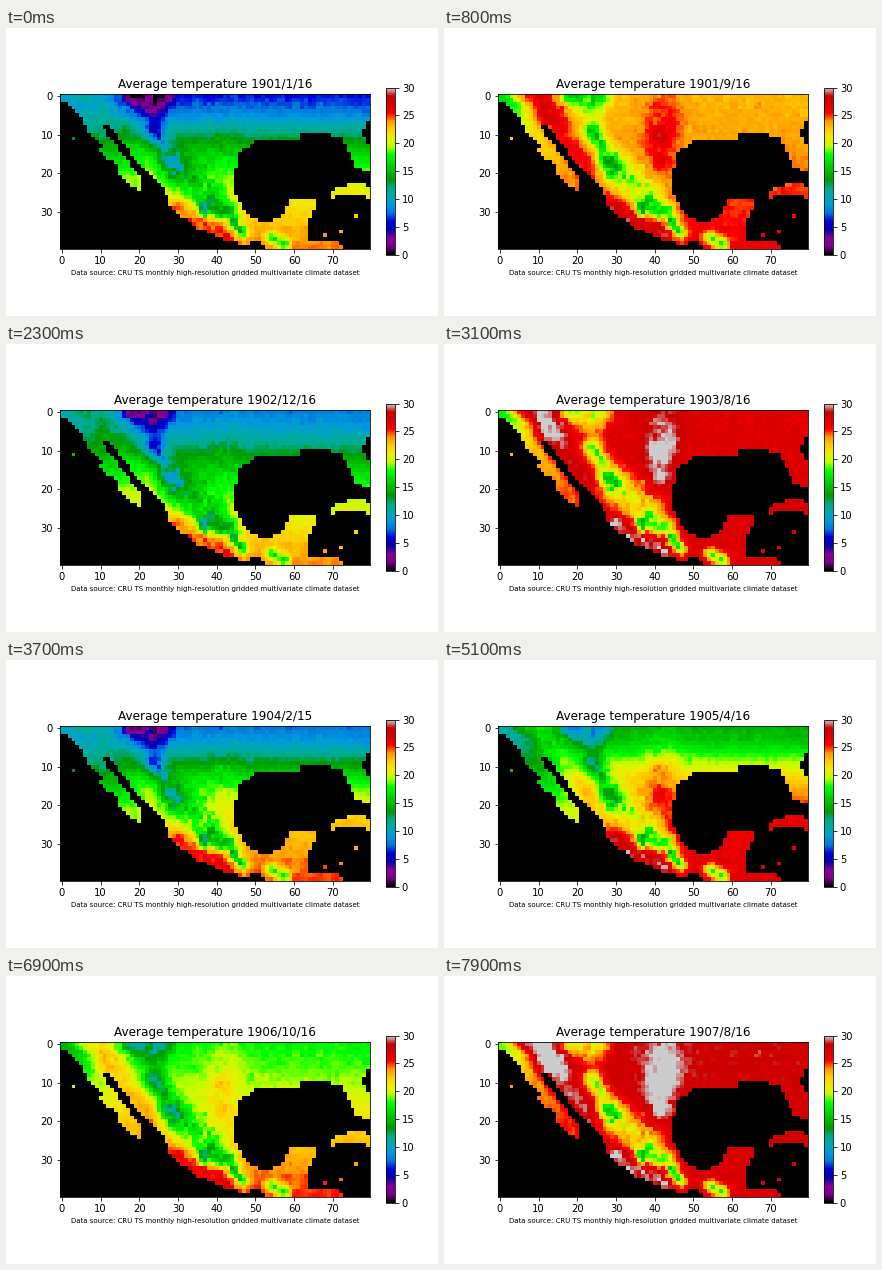
A matplotlib script that plays this animation: 432x288 px, repeating every 8000 ms.

```python
import matplotlib.pyplot as plt
import numpy as np
from matplotlib.animation import FuncAnimation
from matplotlib.path import Path

ROWS, COLS, MONTHS = 40, 80, 80
LEFT, TOP = -120, 35  # half-degree cells from this corner

# Coastlines as (lon, lat)
PACIFIC = [(-121, 36), (-121, 34.6), (-118.4, 33.8), (-117.1, 32.4), (-115.7, 29.7),
           (-114.2, 28.1), (-115, 27.8), (-112.6, 26.2), (-112.1, 24.7),
           (-109.9, 22.9), (-109.5, 23.4), (-111.2, 25.8), (-114.6, 30.4),
           (-114.8, 31.6), (-113, 30.7), (-110.9, 27.9), (-109.2, 25.8),
           (-106.4, 23.2), (-105.5, 20.4), (-102.2, 18), (-97.7, 16.1),
           (-96.4, 15.9), (-94, 16.1), (-92.2, 14.5)]
GULF = [(-83.2, 14.5), (-84.4, 15.8), (-88.4, 15.8), (-88.3, 18.3), (-86.9, 21.4),
        (-90.2, 21.2), (-91.4, 18.7), (-94, 18.2), (-96.1, 19.2), (-97.8, 22.4),
        (-97.3, 27.4), (-94.7, 29.4), (-89.3, 29.2), (-89.2, 30.2), (-86, 30.3),
        (-83.6, 29.7), (-81.6, 25.9), (-80.4, 25.2), (-79.8, 26.8), (-81.4, 30.5),
        (-79, 33), (-79, 36)]
CUBA = [(-84.9, 21.9), (-84.1, 22.6), (-82, 23.2), (-79, 22.8), (-79, 21.7), (-82.5, 22.3)]
ISLETS = [(3, 11), (68, 36), (72, 35), (76, 31)]

# Ridges and basins: x0, y0, x1, y1, width, January shift, August shift
RELIEF = [(20, 0, 25, 0, 4, -7, -8), (24, 5, 25, 9, 2.5, -3, -1.5),
          (24.5, 10, 29, 18, 2.6, -5, -8), (31, 20, 38, 26, 4.5, -4.5, -6),
          (38, 29.5, 43, 30.5, 2.4, -7.5, -8), (45, 33, 47, 36, 1.8, -7, -9),
          (55, 37, 58, 39, 1.6, -6, -8), (11, 1, 14, 5, 4, 1, 4),
          (17, 11, 24, 20, 2.2, 1, 1.3), (42, 3, 44, 8, 4.5, 0, 2.2),
          (41, 11, 42, 17, 3.2, 0, 3), (30, 30, 44, 36, 3, 2.5, 2.5)]

row, col = np.mgrid[:ROWS, :COLS] + 0.5
rng = np.random.default_rng(4)


def inside(shape):
    """Cells that the outline touches."""
    path = Path(shape)
    hit = np.zeros((ROWS, COLS), bool)
    for dx in (-.42, 0, .42):
        for dy in (-.42, 0, .42):
            pts = np.c_[(LEFT + (col + dx) / 2).ravel(), (TOP - (row + dy) / 2).ravel()]
            hit |= path.contains_points(pts).reshape(hit.shape)
    return hit


def ridge(x0, y0, x1, y1, width):
    """Bell-shaped profile around a line segment."""
    dx, dy = x1 - x0, y1 - y0
    t = np.clip(((col - x0) * dx + (row - y0) * dy) / (dx * dx + dy * dy), 0, 1)
    gap = np.hypot(col - x0 - t * dx, row - y0 - t * dy)
    return np.exp(-(gap / width) ** 2)


# Distance inland from the Pacific shore, in cells
inland = np.maximum(col - np.interp(row, [0, 3, 24], [-1, 4, 20.5]), 0)


def climate():
    """January and August temperature fields."""
    jan = np.interp(row, [0, 5, 15, 22, 40], [6, 8, 16, 19.8, 24.5])
    jan += 6 * np.exp(-(col / 13) ** 2) * np.clip(1 - row / 16, 0, 1)
    aug = np.full_like(jan, 27.2)
    rough = 0.2
    for *line, cold, warm in RELIEF:
        bump = ridge(*line)
        jan += cold * bump
        aug += warm * bump
        rough = rough + 0.08 * abs(warm) * bump
    breeze = np.exp(-(inland / np.interp(row, [0, 8], [5.5, 3])) ** 2)
    breeze *= np.interp(row, [0, 10, 24, 27], [10, 4.5, 2, 0])
    patches = np.kron(rng.normal(size=(ROWS // 2, COLS // 2)), np.ones((2, 2)))
    grain = rough * (patches + rng.normal(size=row.shape))
    return jan - breeze / 4 + grain, aug - breeze + grain


def seasons():
    """How many months each cell trails the sun: late by the ocean, early in the south."""
    south = np.clip((row - 4) / 20, 0, 1) * np.clip(inland / 10, 0, 1)
    return 0.3 + 0.7 * np.exp(-(inland / 9) ** 2) - 1.1 * south


land = inside(PACIFIC + GULF) | inside(CUBA)
for x, y in ISLETS:
    land[y, x] = True
jan, aug = climate()
lag = seasons()
swing = np.clip(1.1 - row / 35, 0.05, 1)


def wave(m):
    return np.cos(2 * np.pi * (m - lag) / 12)


def field(i):
    season = (wave(0) - wave(i)) / (wave(0) - wave(7))
    # slow warm and cool spells, and one hard winter
    spell = np.cos(2 * np.pi * (i - 37) / 21) - 4.8 * np.exp(-((i - 59) / 1.5) ** 2)
    return np.where(land, jan + (aug - jan) * season + spell * swing, 0)


def label(i):
    year, month = divmod(i, 12)
    day = 15 if month == 1 else 16
    return f"Average temperature {1901 + year}/{month + 1}/{day}"


plt.rcParams.update({"font.family": "DejaVu Sans", "font.size": 10,
                     "figure.subplot.bottom": 0.125})
fig, ax = plt.subplots(figsize=(6, 4), dpi=72)
image = ax.imshow(field(0), cmap="nipy_spectral", vmin=0, vmax=30,
                  interpolation="nearest")
fig.colorbar(image, ax=ax, fraction=0.025, pad=0.05)
title = ax.set_title(label(0))
ax.set_xticks(range(0, COLS, 10))
ax.set_yticks(range(0, ROWS, 10))
ax.set_xlabel("Data source: CRU TS monthly high-resolution gridded "
              "multivariate climate dataset", fontsize=7)


def update(i):
    image.set_data(field(i))
    title.set_text(label(i))
    return image, title


anim = FuncAnimation(fig, update, frames=MONTHS, interval=100, repeat=True,
                     repeat_delay=0, blit=False)
plt.show()
```
